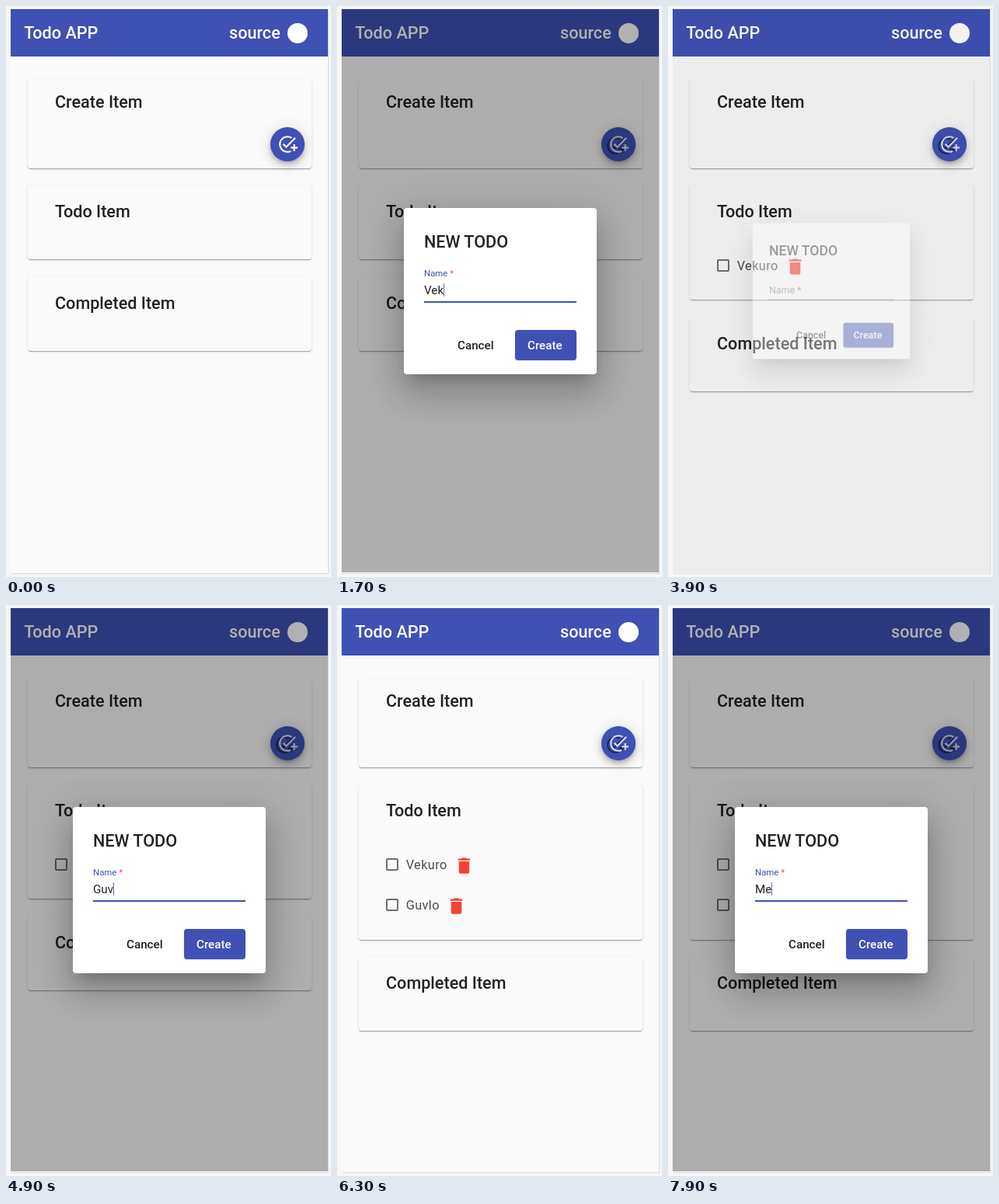
Recreate the animation shown at these times as an HTML page. Size 418 by 735 pixels, loop 8000 ms.

```html
<!DOCTYPE html>
<html lang="en">
<head>
<meta charset="utf-8">
<title>Todo APP</title>
<style>
  html, body { margin: 0; width: 100%; height: 100%; overflow: hidden; background: #f7f7f7; }
  body { font-family: Roboto, Arial, sans-serif; }
  div, span, svg { position: absolute; }
  span { line-height: 0; white-space: pre; }
  #stage { left: 0; top: 0; width: 418px; height: 735px; overflow: hidden; }
  #page { left: 6px; top: 4px; width: 408px; height: 726px; background: #fafafa; box-shadow: 1px 1px 1px #ddd; }
  #bar { left: 6px; top: 4px; width: 408px; height: 61px; background: #3f51b5; }
  #logo { left: 362px; top: 22px; width: 26px; height: 26px; border-radius: 50%; background: #fff; }
  .card {
    left: 28px; width: 364.5px; border-radius: 4px; background: #fafafa;
    box-shadow: 0 2.2px 1.1px -1.1px #0003, 0 1.1px 1.1px #00000024, 0 1.1px 3.2px #0000001f;
  }
  .box { left: 34.5px; width: 12px; height: 12px; border: 2.4px solid #707070; border-radius: 2px; }
  #fab {
    left: 340.2px; top: 156.2px; width: 43.6px; height: 43.6px; border-radius: 50%; background: #3f51b5;
    box-shadow: 0 3px 5px -1px #0003, 0 6px 11px #00000024, 0 1px 19px #0000001f;
  }
  #veil { left: 6px; top: 4px; width: 408px; height: 725px; background: #000; }
  #dialog {
    left: 86px; top: 260px; width: 248px; height: 214px; border-radius: 4px; background: #fff;
    box-shadow: 0 12px 16px -7.6px #0003, 0 26px 41px 3px #00000024, 0 10px 50px 9px #0000001f;
  }
  #line { left: 26px; top: 120px; width: 196px; height: 1px; background: #949494; }
  #focus { left: 26px; top: 119.5px; width: 196px; height: 2.4px; background: #3f51b5; }
  #create {
    left: 142.5px; top: 157px; width: 79.5px; height: 39px; border-radius: 4px; background: #3f51b5;
    box-shadow: 0 1px 2px #0002;
  }
  #caret { top: -9px; width: 1px; height: 17px; background: #6670b8; }
</style>
</head>
<body>
<div id="stage">
  <div id="page"></div>
  <div id="bar"></div>
  <div id="logo"></div>
  <div class="card" id="make"></div>
  <div class="card" id="todo"></div>
  <div class="card" id="done"></div>
  <div id="fab"></div>
  <div id="veil"></div>
  <div id="dialog">
    <div id="line"></div>
    <div id="focus"></div>
    <div id="create"></div>
  </div>
</div>
<script>
const LOOP = 8000, INK = 'rgba(0,0,0,.87)', BLUE = '#3f51b5', ROW = 52.3;
const ADD_TASK = 'M22 5.18L10.59 16.6l-4.24-4.24 1.41-1.41 2.83 2.83 10-10zM12 20c-4.41 0-8-3.59-8-8s3.59-8 8-8' +
  'c1.57 0 3.04.46 4.28 1.25l1.45-1.45C16.1 2.67 14.13 2 12 2 6.48 2 2 6.48 2 12s4.48 10 10 10' +
  'c1.73 0 3.36-.44 4.78-1.22l-1.5-1.5c-1 .46-2.11.72-3.28.72zm7-5h-3v2h3v3h2v-3h3v-2h-3v-3h-2z';
const TRASH = 'M6 19c0 1.1.9 2 2 2h8c1.1 0 2-.9 2-2V7H6zM19 4h-3.5l-1-1h-5l-1 1H5v2h14z';

// One entry per visit to the dialog: key times, and when the caret blinks off.
const visits = [
  { open: 480, close: 3201, word: 'Vekuro', keys: [1300, 1500, 1700, 2100, 2900, 3000], blink: [2600, 2900] },
  { open: 3880, close: 5901, word: 'Guvlo', keys: [4600, 4800, 4900, 5200, 5300], blink: [5700, 5901] },
  { open: 6580, close: Infinity, word: 'Me', keys: [7400, 7800], blink: [0, 0] }
];

const el = id => document.getElementById(id);
const clamp = v => Math.min(1, Math.max(0, v));
const show = (node, on) => { node.style.visibility = on ? 'inherit' : 'hidden'; };

function bezier(x1, y1, x2, y2) {
  const at = (a, b, s) => 3 * a * s * (1 - s) ** 2 + 3 * b * s * s * (1 - s) + s ** 3;
  return x => {
    if (x <= 0 || x >= 1) return clamp(x);
    let lo = 0, hi = 1;
    for (let i = 0; i < 24; i++) {
      const mid = (lo + hi) / 2;
      if (at(x1, x2, mid) < x) lo = mid; else hi = mid;
    }
    return at(y1, y2, lo);
  };
}
const swift = bezier(.25, .8, .25, 1), decel = bezier(0, 0, .2, 1);

// Places text by its baseline.
function text(parent, str, x, base, size, weight, color) {
  const s = document.createElement('span');
  s.textContent = str;
  s.style.cssText = `left:${x}px;top:${base - .342 * size}px;font-size:${size}px;font-weight:${weight};color:${color}`;
  parent.append(s);
  return s;
}

function icon(parent, path, x, y, size, color) {
  parent.insertAdjacentHTML('beforeend',
    `<svg viewBox="0 0 24 24" width="${size}" height="${size}" style="left:${x}px;top:${y}px"><path d="${path}" fill="${color}"/></svg>`);
  return parent.lastElementChild;
}

function place(node, top, height) {
  node.style.top = top + 'px';
  node.style.height = height + 'px';
}

const make = el('make'), todo = el('todo'), done = el('done'), dialog = el('dialog'), fab = el('fab');
text(el('stage'), 'Todo APP', 23.3, 42, 21.6, 500, '#fff');
text(el('stage'), 'source', 287, 42, 21.6, 500, '#fff');
text(make, 'Create Item', 35, 36, 21.6, 500, INK);
text(todo, 'Todo Item', 35, 42, 21.6, 500, INK);
text(done, 'Completed Item', 35, 42, 21.6, 500, INK);
el('stage').append(el('veil'), dialog);
place(make, 95, 113.5);

const ghost = icon(fab, ADD_TASK, 5, 11, 26, 'rgba(24,30,66,.8)');
const plus = icon(fab, ADD_TASK, 9, 9, 26, '#fff');

const rows = visits.slice(0, 2).map((v, i) => {
  const row = document.createElement('div'), mid = 104 + i * ROW;
  todo.append(row);
  row.insertAdjacentHTML('beforeend', `<div class="box" style="top:${mid - 8.4}px"></div>`);
  const label = text(row, v.word, 60.7, mid + 6, 16.3, 400, 'rgba(0,0,0,.7)');
  label.style.letterSpacing = '.4px';
  icon(row, TRASH, 60.7 + label.offsetWidth + 8.5, mid - 13, 27, '#f44336');
  return row;
});

text(dialog, 'NEW TODO', 26, 51, 21.6, 500, INK);
text(dialog, 'Cancel', 69, 182, 15.2, 500, INK);
text(dialog, 'Create', 159, 182, 15.2, 500, '#fff');
const label = text(dialog, 'Name ', 26, 111, 15.2, 400, '');
const star = document.createElement('b');
star.textContent = '*';
star.style.fontWeight = 400;
label.append(star);
label.style.transformOrigin = `0 ${.342 * 15.2}px`;
const input = text(dialog, '', 26, 111, 15.2, 400, INK);
const typed = document.createTextNode(''), caret = document.createElement('span');
caret.id = 'caret';
input.append(typed, caret);

function drawDialog(v, t) {
  const closing = t >= v.close, age = t - v.open, out = t - v.close;
  const enter = decel(clamp(age / 150));
  const alpha = closing ? 1 - clamp(out / 75) : enter;
  show(dialog, alpha > 0);
  dialog.style.opacity = alpha;
  dialog.style.transform = `scale(${.7 + .3 * enter})`;
  el('veil').style.opacity = .31 * (closing ? 1 - swift(clamp(out / 400)) : swift(clamp(age / 400)));

  const focused = age > 200, lift = swift(clamp((age - 200) / 400));
  label.style.transform = `translateY(${-23 * lift}px) scale(${1 - .25 * lift})`;
  label.style.color = focused ? BLUE : 'rgba(0,0,0,.54)';
  star.style.color = focused ? '#ff4081' : 'inherit';
  el('focus').style.transform = `scaleX(${swift(clamp((age - 200) / 300))})`;

  typed.data = v.word.slice(0, v.keys.filter(k => t >= k).length);
  show(caret, focused && !(t >= v.blink[0] && t < v.blink[1]));
}

function draw(t) {
  const count = visits.filter(v => t >= v.close).length;
  rows.forEach((row, i) => { row.style.display = i < count ? '' : 'none'; });
  place(todo, 230.5, 95.5 + count * ROW);
  place(done, 348 + count * ROW, 95.5);
  const pressed = t >= 400;
  show(ghost, pressed);
  plus.style.opacity = pressed ? .82 : 1;
  drawDialog(visits.filter(v => t >= v.open).pop() || visits[0], t);
}

const start = performance.now();
function tick() {
  draw((performance.now() - start) % LOOP);
  requestAnimationFrame(tick);
}
tick();
</script>
</body>
</html>
```
